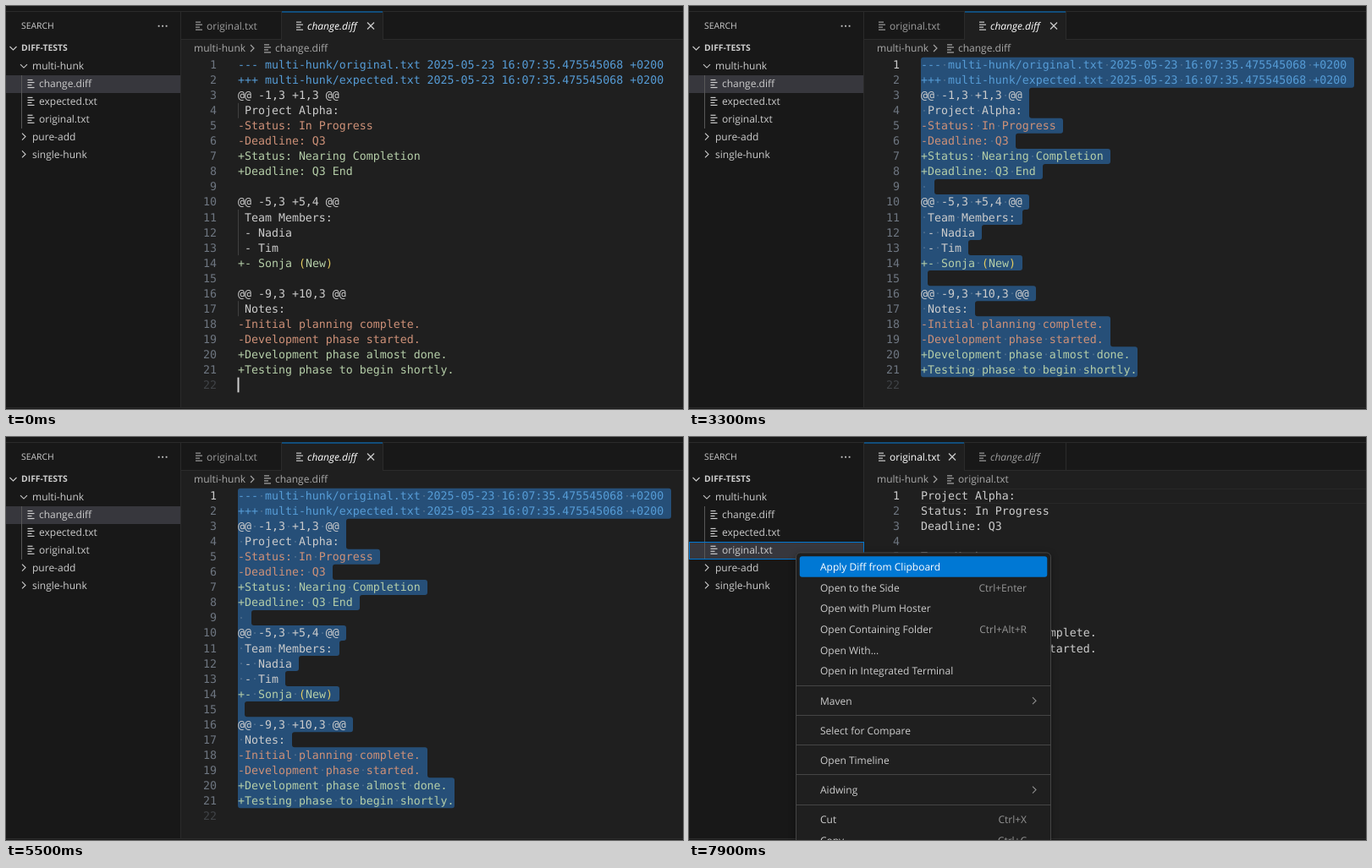
An HTML page with a canvas that plays this animation: 800 px wide and 477 px high, repeating every 8 s.

```html
<!DOCTYPE html>
<html lang="en">
<head>
<meta charset="utf-8">
<title>Applying a diff in an editor</title>
<style>
  html, body { margin: 0; width: 100%; height: 100%; overflow: hidden; background: #181818; }
  canvas { display: block; width: 800px; height: 477px; }
</style>
</head>
<body>
<canvas id="stage" width="800" height="477"></canvas>
<script>
const ctx = document.getElementById('stage').getContext('2d');
ctx.textRendering = 'geometricPrecision';

const LOOP = 8000;
const UI = '12px "Open Sans", sans-serif';
const MONO = '13.288px "DejaVu Sans Mono", monospace';
const CODE_X = 274, CODE_TOP = 60.7, LINE = 18.03, CHAR = 8;
const ROW = 20.88, TREE_TOP = 61.1, SIDE = 207;
const BORDER = '#2b2b2b', TEXT = '#cccccc', BLUE = '#0078d4';

const diffLines = [
  '--- multi-hunk/original.txt 2025-05-23 16:07:35.475545068 +0200',
  '+++ multi-hunk/expected.txt 2025-05-23 16:07:35.475545068 +0200',
  '@@ -1,3 +1,3 @@', ' Project Alpha:', '-Status: In Progress', '-Deadline: Q3',
  '+Status: Nearing Completion', '+Deadline: Q3 End', ' ',
  '@@ -5,3 +5,4 @@', ' Team Members:', ' - Nadia', ' - Tim', '+- Sonja (New)', '',
  '@@ -9,3 +10,3 @@', ' Notes:', '-Initial planning complete.', '-Development phase started.',
  '+Development phase almost done.', '+Testing phase to begin shortly.', ''
];
const textLines = [
  'Project Alpha:', 'Status: In Progress', 'Deadline: Q3', '', 'Team Members:', '- Nadia', '- Tim', '',
  'Notes:', 'Initial planning complete.', 'Development phase started.', ''
];

const tree = [
  { name: 'multi-hunk', open: true },
  { name: 'change.diff', file: true }, { name: 'expected.txt', file: true }, { name: 'original.txt', file: true },
  { name: 'pure-add' }, { name: 'single-hunk' }
];

// Menu entries: [label, shortcut]; '>' is a submenu, null a separator.
const editorMenu = [
  ['Open with Plum Hoster'], null, ['Aidwing', '>'], null,
  ['Change All Occurrences', 'Ctrl+F2'], ['Refactor...', 'Ctrl+Shift+R'], null,
  ['Cut', 'Ctrl+X'], ['Copy', 'Ctrl+C'], ['Paste', 'Ctrl+V'], null,
  ['Command Palette...', 'Ctrl+Shift+P']
];
const fileMenu = [
  ['Apply Diff from Clipboard'], ['Open to the Side', 'Ctrl+Enter'], ['Open with Plum Hoster'],
  ['Open Containing Folder', 'Ctrl+Alt+R'], ['Open With...'], ['Open in Integrated Terminal'], null,
  ['Maven', '>'], null, ['Select for Compare'], null, ['Open Timeline'], null,
  ['Aidwing', '>'], null, ['Cut', 'Ctrl+X'], ['Copy', 'Ctrl+C']
];

// Step tables: [start time, value...]
const caretSteps = [
  [0, 22, 0], [1300, 21, 32], [1600, 20, 25], [1800, 18, 20], [1900, 16, 15], [2000, 13, 6],
  [2100, 11, 6], [2200, 9, 1], [2300, 7, 3], [2400, 6, 1], [2500, 4, 2], [2600, 2, 5],
  [2700, 1, 8], [3100, 1, 5], [3200, 1, 2], [3300, 1, 0]
];
const caretShown = [[0, true], [300, false], [800, true], [3300, false], [5000, true], [5500, false]];
const editorHover = [
  [0, ''], [3700, 'Open with Plum Hoster'], [3800, ''], [4000, 'Aidwing'],
  [4100, 'Change All Occurrences'], [4200, 'Refactor...'], [4400, ''], [4500, 'Cut'], [4600, 'Copy']
];
const fileHover = [[0, ''], [7900, 'Apply Diff from Clipboard']];
const treeHover = [[0, ''], [5900, 'single-hunk'], [6000, 'pure-add'], [6100, 'original.txt']];

const stepAt = (steps, t) => steps.findLast(s => s[0] <= t);
const lineTop = n => CODE_TOP + (n - 1) * LINE;

function fill(x, y, w, h, color) {
  ctx.fillStyle = color;
  ctx.fillRect(x, y, w, h);
}

function label(str, x, y, color, font = UI, align = 'left') {
  ctx.font = font;
  ctx.textAlign = align;
  ctx.fillStyle = color;
  ctx.fillText(str, x, y);
}

function stroke(points, color, width = 1) {
  ctx.strokeStyle = color;
  ctx.lineWidth = width;
  ctx.beginPath();
  points.forEach(([x, y], i) => i ? ctx.lineTo(x, y) : ctx.moveTo(x, y));
  ctx.stroke();
}

function chevron(x, y, down, color = TEXT) {
  stroke(down ? [[x - 4, y - 2], [x, y + 2], [x + 4, y - 2]] : [[x - 2, y - 4], [x + 2, y], [x - 2, y + 4]], color, 1.1);
}

function fileIcon(x, y, color) {
  [6, 8, 5, 8].forEach((w, i) => fill(x, y - 5 + i * 3, w, 1.2, color));
}

function cross(x, y) {
  stroke([[x - 4, y - 4], [x + 4, y + 4]], TEXT, 1.2);
  stroke([[x + 4, y - 4], [x - 4, y + 4]], TEXT, 1.2);
}

function drawToolbar() {
  const c = TEXT;
  // new file
  stroke([[116, 55.5], [111.5, 55.5], [111.5, 43.5], [117, 43.5], [121.5, 47.5], [121.5, 50]], c);
  stroke([[117, 43.5], [117, 47.5], [121.5, 47.5]], c);
  // new folder
  stroke([[139, 55.5], [133.5, 55.5], [133.5, 44.5], [138, 44.5], [140, 46.5], [146.5, 46.5], [146.5, 50]], c);
  stroke([[133.5, 48.5], [138, 48.5], [140, 46.5]], c);
  for (const x of [120.5, 143.5]) {
    stroke([[x - 3, 54], [x + 3, 54]], c);
    stroke([[x, 51], [x, 57]], c);
  }
  // refresh
  ctx.beginPath();
  ctx.arc(162.5, 50.5, 5, -0.9, 3.9);
  ctx.stroke();
  stroke([[157.5, 43.5], [157.5, 47.5], [161.5, 47.5]], c);
  // collapse all
  stroke([[182.5, 47], [182.5, 44.5], [190.5, 44.5], [190.5, 52.5], [188, 52.5]], c);
  ctx.strokeRect(179.5, 47.5, 8, 8);
  stroke([[181.5, 51.5], [185.5, 51.5]], c);
}

function drawSidebar(t) {
  const picked = t < 6700 ? 'change.diff' : 'original.txt';
  const focused = (t >= 3500 && t < 5000) || t >= 6700;
  const hover = stepAt(treeHover, t)[1];

  fill(SIDE - 1, 7, 1, 469, BORDER);
  label('SEARCH', 18, 27, TEXT, '10.4px "Open Sans", sans-serif');
  for (const x of [180.5, 185, 189.5]) fill(x - 0.8, 22.8, 1.8, 1.8, TEXT);
  chevron(8.5, 50, true);
  label('DIFF-TESTS', 18, 53.3, TEXT, 'bold 10.4px "Open Sans", sans-serif');
  if (t >= 5800 && t < 7300) drawToolbar();

  tree.forEach(({ name, file, open }, i) => {
    const top = Math.round(TREE_TOP + i * ROW), mid = TREE_TOP + (i + 0.5) * ROW - 0.5;
    if (name === picked) {
      fill(0, top, SIDE - 1, 21, t >= 6700 && t < 7300 ? '#04395e' : '#37373d');
    } else if (name === hover && t < 7300) {
      fill(0, top, SIDE - 1, 21, '#2a2d2e');
    }
    if (file) {
      fill(18, top, 1, 21, '#585858');
      fileIcon(25.5, mid, TEXT);
    } else {
      chevron(21, mid, open);
    }
    label(name, file ? 39 : 31, mid + 4.2, TEXT);
    if (name === picked && focused) {
      ctx.strokeStyle = BLUE;
      ctx.lineWidth = 1;
      ctx.strokeRect(0.5, top + 0.5, SIDE - 1, 20);
    }
  });
}

function drawTab(name, x, w, active, italic) {
  const color = active ? '#ffffff' : '#9d9d9d';
  if (active) {
    fill(x, 7, w, 33, '#1f1f1f');
    fill(x, 6.5, w, 1, BLUE);
    cross(x + w - 14, 23.5);
  }
  fill(x + w, 7, 1, 32, BORDER);
  fileIcon(x + 17, 23.5, active ? TEXT : '#9d9d9d');
  label(name, x + 30, 27.5, color, (italic ? 'italic ' : '') + UI);
}

function drawHeader(diffOpen) {
  fill(207, 7, 593, 33, '#181818');
  fill(207, 39, 593, 1, BORDER);
  drawTab('original.txt', 207, 118, !diffOpen, false);
  drawTab('change.diff', 326, 119, diffOpen, true);
  const soft = '#a9a9a9';
  label('multi-hunk', 222, 54.2, soft);
  chevron(291, 50, false, soft);
  fileIcon(305, 50.3, soft);
  label(diffOpen ? 'change.diff' : 'original.txt', 318, 54.2, soft);
}

function lineColor(str) {
  if (/^(---|\+\+\+) /.test(str)) return '#569cd6';
  return { '-': '#ce9178', '+': '#b5cea8' }[str[0]] || TEXT;
}

// One outline around all selected lines, from the caret to the end of line 21.
function drawSelection(first, col, color) {
  const left = CODE_X + col * CHAR, right = [], r = 3;
  for (let n = first; n <= 21; n++) {
    const x = CODE_X + (diffLines[n - 1].length + (n < 21 ? 1 : 0)) * CHAR;
    right.push([x, lineTop(n)], [x, lineTop(n + 1)]);
  }
  const path = [...right, [CODE_X, lineTop(22)]];
  if (col) path.push([CODE_X, lineTop(first + 1)], [left, lineTop(first + 1)]);
  path.push([left, lineTop(first)]);
  ctx.beginPath();
  ctx.moveTo(left + 4, lineTop(first));
  path.forEach(([x, y], i) => {
    const [nx, ny] = path[i + 1] || [left + 4, lineTop(first)];
    ctx.arcTo(x, y, nx, ny, r);
  });
  ctx.closePath();
  ctx.fillStyle = color;
  ctx.fill();
}

function drawCode(lines, active, selFrom) {
  const isDiff = lines === diffLines;
  lines.forEach((str, i) => {
    const n = i + 1, base = lineTop(n) + 13.5;
    const last = n === lines.length;
    label(n, 249, base, last ? '#404347' : n === active ? TEXT : '#6e7681', MONO, 'right');
    let x = CODE_X;
    for (const part of str.split(/([()])/)) {
      label(part, x, base, /^[()]$/.test(part) ? '#e4cc60' : isDiff ? lineColor(str) : TEXT, MONO);
      x += part.length * CHAR;
    }
    if (!selFrom || n < selFrom[0]) return;
    [...str].forEach((ch, c) => {
      if (ch === ' ' && (n > selFrom[0] || c >= selFrom[1])) {
        fill(CODE_X + c * CHAR + 3.2, base - 5.2, 1.6, 1.6, 'rgba(227,228,226,.25)');
      }
    });
  });
}

function drawDiff(t) {
  const [, line, col] = stepAt(caretSteps, t);
  const selecting = t >= 1600;
  diffLines.forEach((str, i) => {
    if (/^ ./.test(str)) fill(CODE_X, lineTop(i + 1), 1, LINE, '#404040');
  });
  if (selecting) drawSelection(line, col, t >= 3500 && t < 5000 ? '#3a3d41' : '#264f78');
  drawCode(diffLines, line, selecting && [line, col]);
  if (stepAt(caretShown, t)[1]) fill(CODE_X - 0.5 + col * CHAR, lineTop(line) + 0.3, 2, 17.7, '#d0d0d0');
}

function drawText() {
  for (const y of [61, 78]) fill(CODE_X, y, 526, 1, '#282828');
  drawCode(textLines, 1);
}

function drawMenu(items, x, top, w, hover) {
  const itemH = 24.7, sepH = 10.44, pad = 4.74;
  const h = items.reduce((sum, it) => sum + (it ? itemH : sepH), pad * 2);
  ctx.save();
  ctx.shadowColor = 'rgba(0,0,0,.36)';
  ctx.shadowBlur = 8;
  ctx.shadowOffsetY = 2;
  ctx.beginPath();
  ctx.roundRect(x + 0.5, top + 0.5, w - 1, h - 1, 5);
  ctx.fillStyle = '#1f1f1f';
  ctx.fill();
  ctx.restore();
  ctx.strokeStyle = '#454545';
  ctx.lineWidth = 1;
  ctx.stroke();

  let y = top + pad;
  for (const item of items) {
    if (!item) {
      fill(x + 1, Math.floor(y + sepH / 2), w - 2, 1, '#454545');
      y += sepH;
      continue;
    }
    const [name, key] = item, on = name === hover, mid = y + itemH / 2;
    if (on) {
      ctx.beginPath();
      ctx.roundRect(x + pad, y, w - pad * 2, itemH, 3);
      ctx.fillStyle = BLUE;
      ctx.fill();
    }
    label(name, x + 29, mid + 4.4, on ? '#ffffff' : TEXT);
    if (key === '>') chevron(x + w - 20, mid, false, on ? '#ffffff' : '#8f8f8f');
    else if (key) label(key, x + w - 29, mid + 4.4, on ? '#ffffff' : '#959595', UI, 'right');
    y += itemH;
  }
}

function draw(t) {
  const diffOpen = t < 6700;
  fill(0, 0, 800, 477, '#181818');
  fill(207, 7, 593, 469, '#1f1f1f');
  fill(0, 6, 800, 1, BORDER);
  drawHeader(diffOpen);
  drawSidebar(t);
  if (diffOpen) drawDiff(t);
  else drawText();
  fill(0, 475, 800, 1, BORDER);
  fill(0, 476, 800, 1, '#181818');
  if (t >= 3500 && t < 5000) drawMenu(editorMenu, 316, 116.2, 284, stepAt(editorHover, t)[1]);
  if (t >= 7300) drawMenu(fileMenu, 126, 136.4, 302, stepAt(fileHover, t)[1]);
}

function frame() {
  draw(performance.now() % LOOP);
  requestAnimationFrame(frame);
}
frame();
</script>
</body>
</html>
```
